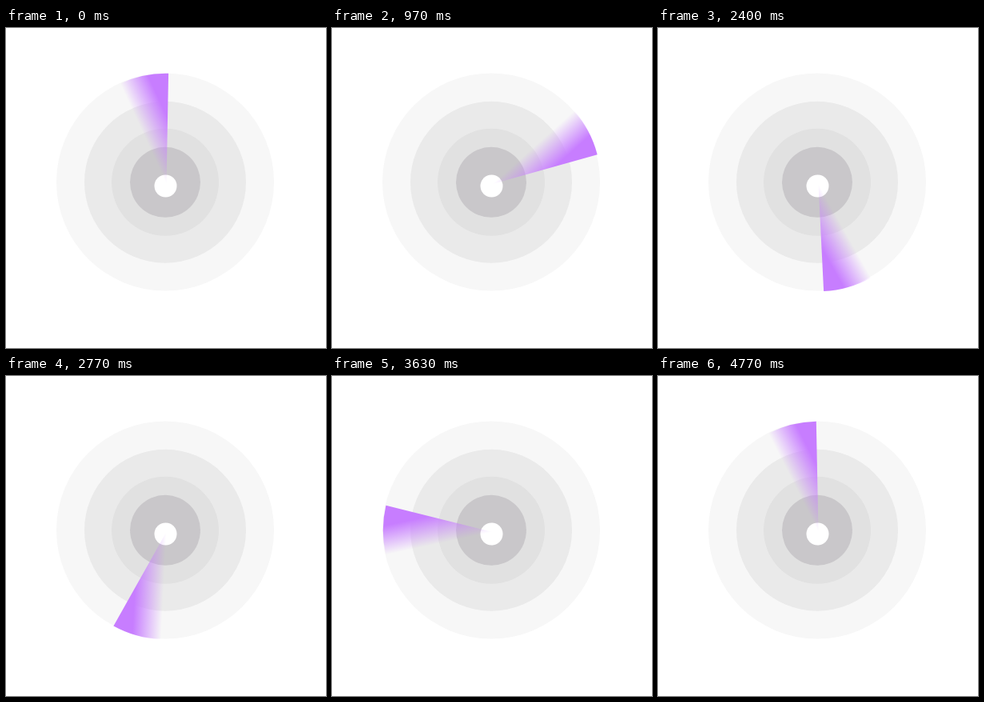
An HTML page that plays this animation: 400x400 px, repeating every 4.81 s.

```html
<!DOCTYPE html>
<html lang="en">
<head>
<meta charset="utf-8">
<title>Radar sweep</title>
<style>
html, body { margin: 0; width: 100%; height: 100%; overflow: hidden; background: #fff; }
svg { display: block; width: 100%; height: 100%; }
</style>
</head>
<body>
<svg viewBox="0 0 400 400">
  <defs>
    <linearGradient id="fade" gradientUnits="userSpaceOnUse">
      <stop offset="0" stop-color="#c77dff" stop-opacity="0"/>
      <stop offset="1" stop-color="#c77dff"/>
    </linearGradient>
  </defs>
  <circle cx="199" cy="192.5" r="136" fill="#f7f7f7"/>
  <circle cx="199" cy="192.8" r="101" fill="#eaeaea"/>
  <circle cx="199" cy="192.8" r="67" fill="#e1e1e1"/>
  <circle cx="199" cy="192.8" r="44" fill="#c9c7ca"/>
  <circle cx="199.5" cy="197.5" r="14" fill="#fff"/>
  <path id="beam" fill="url(#fade)"/>
</svg>
<script>
const LOOP = 4810, STEPS = 144, QUARTER = 36;
const KEYS = [1.3, 93, 177, 281, 361.3]; // leading edge, degrees clockwise from top
const WIDTH = 26.2, RADIUS = 136.2, SOFT = 36;
const CENTER = [200, 193], APEX = [200.5, 195];
const beam = document.getElementById('beam');
const fade = document.getElementById('fade');

function rim(deg) {
  const a = deg * Math.PI / 180;
  return [CENTER[0] + RADIUS * Math.sin(a), CENTER[1] - RADIUS * Math.cos(a)];
}

// The sweep advances at 30 steps per second, on a 10 ms clock.
function stepAt(ms) {
  const tick = Math.floor(ms / 10) * 10;
  return Math.min(STEPS - 1, Math.floor((tick + 5) * 0.03));
}

function angleAt(step) {
  const i = Math.floor(step / QUARTER);
  return KEYS[i] + (KEYS[i + 1] - KEYS[i]) * (step % QUARTER) / QUARTER;
}

function draw(ms) {
  const lead = angleAt(stepAt(ms % LOOP));
  const tail = rim(lead - WIDTH), tip = rim(lead);
  beam.setAttribute('d', `M${APEX}L${tail}A${RADIUS} ${RADIUS} 0 0 1 ${tip}Z`);

  // Opacity grows with distance from the trailing edge.
  const dx = tail[0] - APEX[0], dy = tail[1] - APEX[1], len = Math.hypot(dx, dy);
  fade.setAttribute('x1', APEX[0]);
  fade.setAttribute('y1', APEX[1]);
  fade.setAttribute('x2', APEX[0] - dy / len * SOFT);
  fade.setAttribute('y2', APEX[1] + dx / len * SOFT);
}

const start = performance.now();
function loop() {
  draw(performance.now() - start);
  requestAnimationFrame(loop);
}
loop();
</script>
</body>
</html>
```
